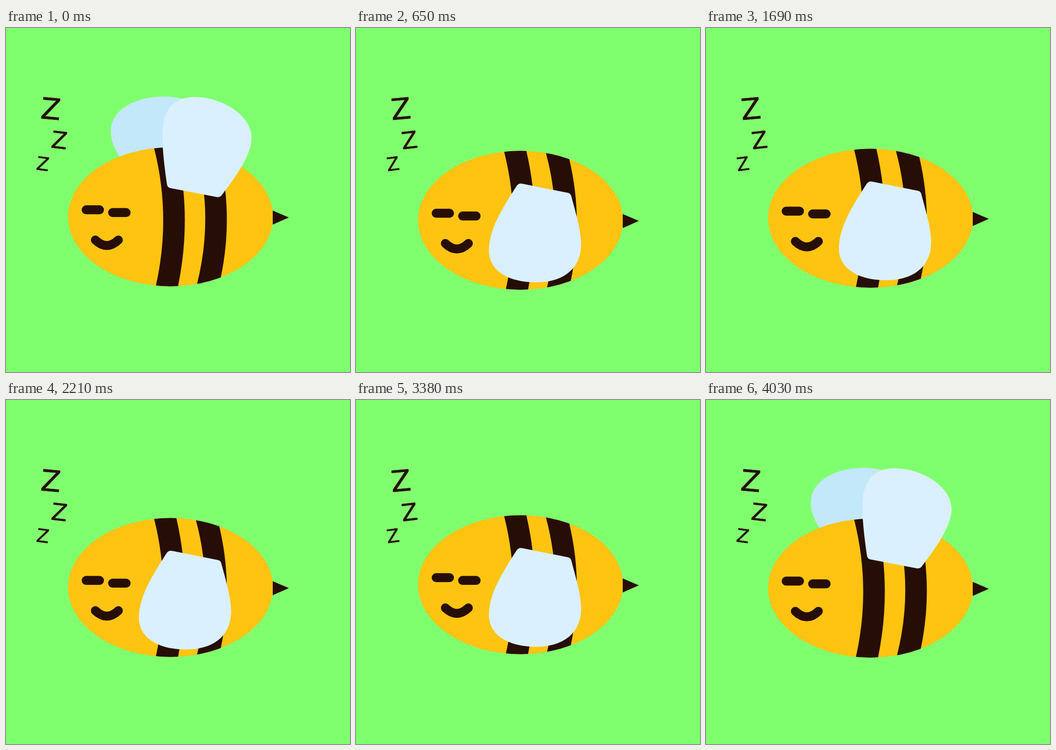
An HTML page that plays this animation: 748 by 748 pixels, repeating every 4.16 s.

```html
<!DOCTYPE html>
<html lang="en">
<head>
<meta charset="utf-8">
<title>Sleepy bee</title>
<style>
  html, body { margin: 0; width: 100%; height: 100%; overflow: hidden; background: #80ff6e; }
  svg { display: block; width: 100%; height: 100%; }
  .dark { fill: #260e07; }
  .face { fill: none; stroke: #260e07; stroke-width: 19.5; stroke-linecap: round; }
  .wing { fill: #daf0fe; }
  .far { fill: #c2e8f9; }
  text { font-family: "DejaVu Sans", sans-serif; text-anchor: middle; stroke: #260e07; stroke-width: .6; }
</style>
</head>
<body>
<svg viewBox="0 0 748 748">
  <defs>
    <clipPath id="belly"><ellipse cx="357.75" cy="410.6" rx="222.8" ry="151.1"/></clipPath>
  </defs>
  <g id="snore" class="dark"></g>
  <g id="bee">
    <path id="farWing" class="far" d="M260 305C245 275 228 255 228 225C228 175 285 149 343 149C365 149 385 153 400 160V300Z"/>
    <ellipse cx="357.75" cy="410.6" rx="222.8" ry="151.1" fill="#ffc411"/>
    <g class="dark" clip-path="url(#belly)">
      <path d="M322 250V261Q359.6 410 326 560V570H374V562Q405.3 410 370.5 260V250Z"/>
      <path d="M413 250V264.5Q452.3 410 415.5 556V570H467V542.5Q494.9 410 464 278.5V250Z"/>
    </g>
    <path class="dark" d="M580 397L615 412L580 427.5Z"/>
    <path class="face" d="M174.3 395.3H203.3M231.8 401.3H261.2M194.3 461Q219.2 485 244.3 461"/>
    <path id="wingUp" class="wing" d="M350 340C345 305 340 265 340 234C340 180 362 150 410 150C470 150 534 190 534 239C534 275 500 323 470.5 361.5Q466 369 458 367.5L357 348Q351 346.5 350 340Z"/>
    <path id="wingDown" class="wing" d="M349.5 335.5C318 384.5 289 430.5 289 476.5C289 522.5 335 545.5 391 545.5C455 545.5 489.5 512.5 489.5 462.5C489.5 432.5 478 395.5 468.5 359.5Q467.5 352.5 461 351L361 331Q354 329.5 349.5 335.5Z"/>
  </g>
</svg>
<script>
  const STEP = 130, STEPS = 32;
  const byId = id => document.getElementById(id);
  const show = (id, on) => byId(id).setAttribute('visibility', on ? 'visible' : 'hidden');

  // Each letter: centre x, centre y, font size, tilt in degrees
  const letters = [[97.5, 175.2, 64, 5], [116.2, 243.4, 51.5, 6.5], [80.3, 295, 40.5, 7.5]].map(([x, y, size, tilt]) => {
    const node = document.createElementNS('http://www.w3.org/2000/svg', 'text');
    node.textContent = 'Z';
    node.setAttribute('font-size', size);
    node.setAttribute('y', size * .3645);
    byId('snore').append(node);
    return { node, x, y, tilt };
  });

  function draw(step) {
    // Linear bob, lowest midway between steps 7 and 8
    const away = Math.abs(step - 7.5);
    const drop = 11.25 - 1.5 * Math.min(away, STEPS - away);
    byId('bee').setAttribute('transform', `translate(0 ${drop})`);

    const up = (step + 1) % 4 < 2;
    show('wingUp', up);
    show('farWing', up);
    show('wingDown', !up);

    const side = (step + 2) % 8 < 4 ? 1 : -1;
    for (const { node, x, y, tilt } of letters)
      node.setAttribute('transform', `translate(${x} ${y}) rotate(${side * tilt})`);
  }

  const start = performance.now();
  function tick() {
    const elapsed = Math.max(0, performance.now() - start);
    draw(Math.floor(elapsed / STEP) % STEPS);
    requestAnimationFrame(tick);
  }
  tick();
</script>
</body>
</html>
```
